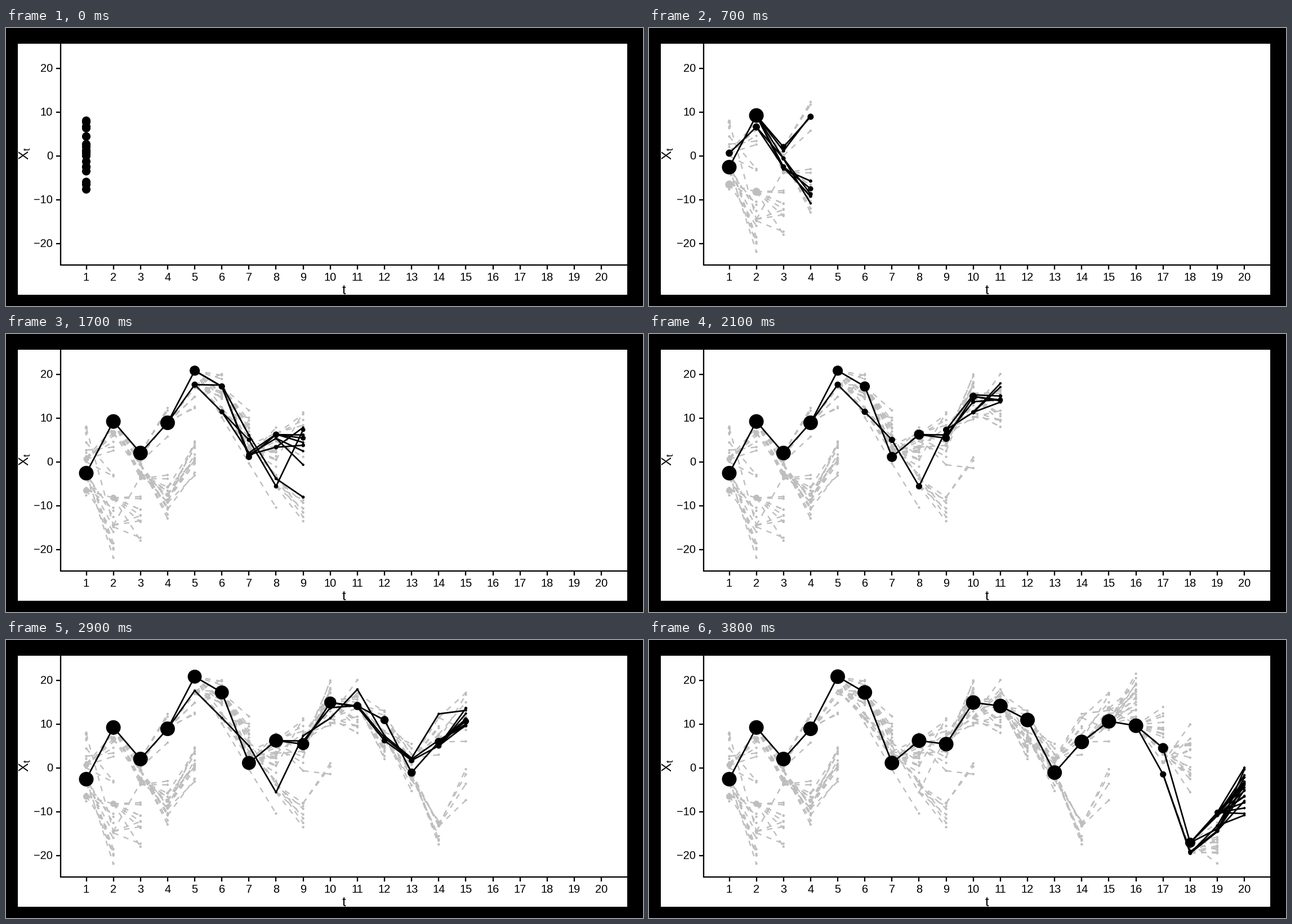
Animation of 1131x495 px, one loop 3.9 s. Source, as a matplotlib script:

```python
import numpy as np
import matplotlib.pyplot as plt
from matplotlib.animation import FuncAnimation
from matplotlib.collections import LineCollection
from matplotlib.patches import Rectangle

W, H, DPI = 1131, 495, 100
PT = 72 / DPI
GRAY = "#bebebe"
R_MIN, R_MAX = 2.2, 13
FONT = "Liberation Sans"

N, STEPS = 20, 20
FRAMES = 2 * STEPS - 1
OBS_SD = 0.8

# The path that wins, and (first step, path) of rivals that die out.
SPINE = [-2.6, 9.2, 2.0, 8.9, 20.8, 17.2, 1.1, 6.2, 5.4, 14.9,
         14.1, 10.9, -1.1, 5.9, 10.6, 9.6, 4.5, -17.1, -10.2, -4.5]
RIVALS = [(1, [7.7, -14.5, -3.4, -7.5]),
          (5, [17.6, 11.4, 5.0, -5.6, 7.3, 11.3, 17.9, 7.3, 2.2, 12.3, 13.1]),
          (17, [-1.5, -19.5, -14.6])]


def drift(x, t):
    return x / 2 + 25 * x / (1 + x * x) + 8 * np.cos(1.2 * t)


def fitness(x, pins):
    """Likelihood of the squared signal; a rival counts half."""
    w = np.zeros(N)
    for share, pin in zip((1, 0.5), pins):
        w += share * np.exp(-0.5 * ((x**2 - pin**2) / 20 / OBS_SD) ** 2)
    return w / w.sum()


def simulate(seed):
    """Particle filter whose first slots follow the fixed paths."""
    rng = np.random.default_rng(seed)
    values, parents = [], []
    for t in range(1, STEPS + 1):
        noise = np.clip(rng.normal(size=N), -2, 2)
        if t == 1:
            par, x = np.zeros(N, int), 4 * noise
        else:
            par = rng.choice(N, N, p=fitness(values[-1], pins))
            par[0] = 0
        pins = [SPINE[t - 1]]
        for start, path in RIVALS:
            if start <= t < start + len(path):
                pins.append(path[t - start])
                par[1] = int(t > start)
        if t > 1:
            x = drift(values[-1][par], t) + np.sqrt(10) * noise
        x[:len(pins)] = pins
        values.append(x)
        parents.append(par)
    return values, parents


values, parents = simulate(4)


def offspring(t, weight):
    return np.bincount(parents[t], weights=weight, minlength=N)


def counts(frame):
    """Living descendants of every node; odd frames show the resampling."""
    last = frame // 2
    n = np.ones(N)
    if frame % 2:
        n = offspring(last + 1, n)
    out = [n]
    for t in range(last, 0, -1):
        out.insert(0, offspring(t, out[0]))
    return out


# Dead nodes keep the last count they had while alive.
history, kept = [], [np.ones(N) for _ in range(STEPS)]
for k in range(FRAMES):
    now = counts(k)
    for t, n in enumerate(now):
        kept[t] = np.where(n > 0, n, kept[t])
    history.append((now, [m.copy() for m in kept[:len(now)]]))


def radius(n, top):
    if top <= 1:
        return np.full(N, (R_MIN + R_MAX) / 2)
    return R_MIN + (R_MAX - R_MIN) * np.clip((n - 1) / (top - 1), 0, 1)


def px(t):
    return 142.5 + 48.14 * t


def py(v):
    return 227.5 - 7.8 * np.asarray(v)


fig = plt.figure(figsize=(W / DPI, H / DPI), dpi=DPI, facecolor="black")
ax = fig.add_axes([0, 0, 1, 1])
ax.set_xlim(0, W)
ax.set_ylim(H, 0)
ax.axis("off")
ax.add_patch(Rectangle((20.5, 28), 1082.5, 446.5, fc="white", lw=0, zorder=0))


def rule(xs, ys):
    ax.plot(xs, ys, color="black", lw=2.3 * PT, solid_capstyle="butt", zorder=6)


def label(x, y, s, size=20, **kw):
    ax.text(x, y, s, fontsize=size * PT, family=FONT, color="black",
            va="baseline", rotation_mode="anchor", zorder=7, **kw)


rule([97, 97], [28, 423])
rule([96, 1103], [421.8, 421.8])
for v in range(-20, 21, 10):
    rule([88.5, 97], [py(v)] * 2)
    label(83, py(v) + 7, str(v).replace("-", "\u2212"), ha="right")
for i in range(STEPS):
    rule([px(i)] * 2, [422, 430])
    label(px(i), 450, str(i + 1), ha="center")
label(600, 474, "t", 24, ha="center")
label(39, 234.5, "X", 24, ha="left", rotation=90)
label(43, 218.5, "t", 17, ha="left", rotation=90)

dead_lines = LineCollection([], colors=GRAY, linewidths=2.4 * PT,
                            linestyles=[(0, (4, 4))], capstyle="butt", zorder=1)
live_lines = LineCollection([], colors="black", linewidths=2.7 * PT,
                            capstyle="butt", zorder=3)
ax.add_collection(dead_lines, autolim=False)
ax.add_collection(live_lines, autolim=False)
dead_dots = ax.scatter([], [], color=GRAY, linewidths=0, zorder=2)
live_dots = ax.scatter([], [], color="black", linewidths=0, zorder=4)


def place(dots, rows):
    rows = np.array(rows).reshape(-1, 3)
    dots.set_offsets(rows[:, :2])
    dots.set_sizes((2 * rows[:, 2] * PT) ** 2)


def draw(frame):
    now, old = history[frame]
    top = max(n.max() for n in now)
    lines, dots = ([], []), ([], [])
    for t, n in enumerate(now):
        ys = py(values[t])
        rs = radius(old[t], top)
        for i, y in enumerate(ys):
            alive = int(n[i] > 0)
            dots[alive].append((px(t), y, rs[i]))
            if t:
                start = py(values[t - 1][parents[t][i]])
                lines[alive].append([(px(t - 1), start), (px(t), y)])
    dead_lines.set_segments(lines[0])
    live_lines.set_segments(lines[1])
    place(dead_dots, dots[0])
    place(live_dots, dots[1])
    return dead_lines, dead_dots, live_lines, live_dots


anim = FuncAnimation(fig, draw, frames=FRAMES, init_func=lambda: draw(0),
                     interval=100, repeat=True, repeat_delay=0, blit=False)
plt.show()
```
